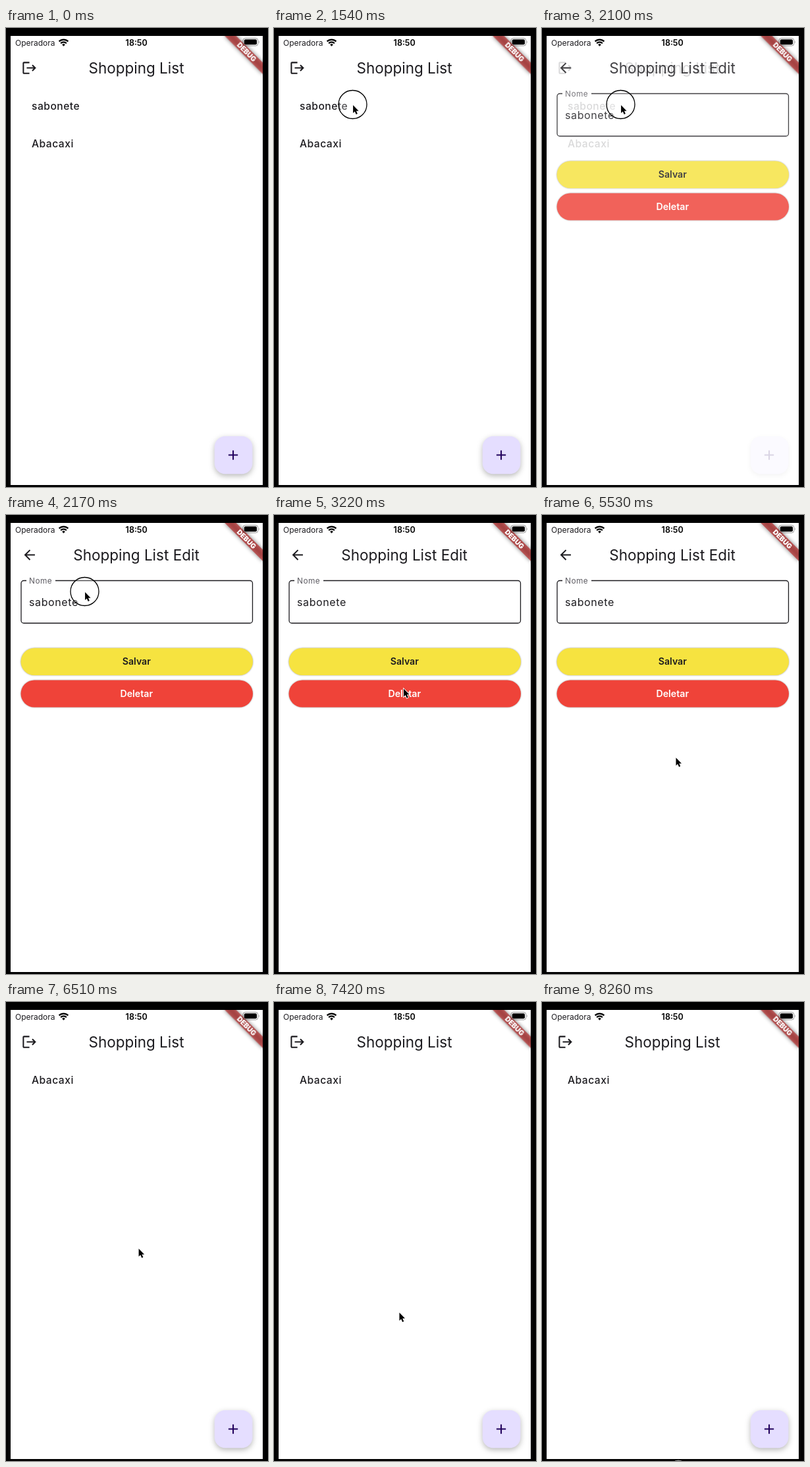
Write an HTML page that moves like this. It is 398 px wide and 696 px high and loops after 8330 ms.

```html
<!DOCTYPE html>
<html lang="pt">
<head>
<meta charset="utf-8">
<title>Shopping List</title>
<style>
  html, body { margin: 0; width: 100%; height: 100%; overflow: hidden; background: #000; }
  svg { display: block; width: 398px; height: 696px; font-family: Inter, Roboto, sans-serif; fill: #1c1b1f; }
  .title { font-size: 22.5px; text-anchor: middle; }
  .item { font-size: 15.6px; font-weight: 500; letter-spacing: .5px; }
  .field { font-size: 16px; letter-spacing: .6px; }
  .label { font-size: 11.8px; letter-spacing: .5px; fill: #5d5b62; }
  .button { font-size: 14.2px; font-weight: 600; text-anchor: middle; }
  .raised { filter: drop-shadow(0 .6px 1px rgba(0, 0, 0, .4)); }
  .fab { filter: drop-shadow(0 3px 4px rgba(0, 0, 0, .28)); }
</style>
</head>
<body>
<svg viewBox="0 0 398 696">
  <defs>
    <clipPath id="screen"><rect x="7" y="12" width="383" height="681"/></clipPath>
    <clipPath id="pill"><rect x="22.5" y="250.5" width="352.5" height="41" rx="20.5"/></clipPath>
    <filter id="blur" x="-30%" y="-150%" width="160%" height="400%"><feGaussianBlur stdDeviation="3"/></filter>
  </defs>
  <rect width="398" height="696" fill="#000"/>
  <rect x="7" y="12" width="383" height="681" fill="#fff"/>

  <g id="list">
    <path transform="translate(23.3 48.3) scale(1.021)" d="M17 7l-1.41 1.41L18.17 11H8v2h10.17l-2.58 2.58L17 17l5-5zM4 5h8V3H4c-1.1 0-2 .9-2 2v14c0 1.1.9 2 2 2h8v-2H4z"/>
    <text class="title" x="198" y="69">Shopping List</text>
    <text class="item" id="first" x="39" y="124">sabonete</text>
    <text class="item" id="second" x="39" y="181">Abacaxi</text>
    <rect class="fab" x="316.8" y="619" width="57.6" height="57.2" rx="16.3" fill="#e5deff"/>
    <path transform="translate(332.8 635.3) scale(1.021)" fill="#21005d" d="M19 13h-6v6h-2v-6H5v-2h6V5h2v6h6z"/>
  </g>

  <g id="edit">
    <path transform="translate(23.5 48.3) scale(1.021)" d="M20 11H7.83l5.59-5.59L12 4l-8 8 8 8 1.41-1.41L7.83 13H20z"/>
    <text class="title" x="198" y="69">Shopping List Edit</text>
    <path d="M31 99.5H27a4 4 0 0 0-4 4V160a4 4 0 0 0 4 4H370.5a4 4 0 0 0 4-4V103.5a4 4 0 0 0-4-4H75" fill="none" stroke="#1c1b1f" stroke-width="1.3"/>
    <text class="label" x="35" y="104.3">Nome</text>
    <text class="field" x="35" y="138">sabonete</text>
    <rect class="raised" x="22.5" y="201.7" width="352.5" height="41.3" rx="20.6" fill="#f6e340"/>
    <text class="button" x="198.3" y="227.2">Salvar</text>
    <rect class="raised" x="22.5" y="250.5" width="352.5" height="41" rx="20.5" fill="#ef4339"/>
    <g clip-path="url(#pill)"><circle id="ripple" cx="197.5" cy="271" fill="#6750a4"/></g>
    <text class="button" x="198.3" y="276.2" fill="#fff">Deletar</text>
  </g>

  <g clip-path="url(#screen)">
    <g transform="translate(390 12) rotate(45) scale(1.021)">
      <rect x="-40" y="28" width="80" height="12" fill="#000" opacity=".5" filter="url(#blur)"/>
      <rect x="-40" y="28" width="80" height="12" fill="#b71c1c" opacity=".627"/>
      <text y="37.7" font-size="10.2" font-weight="900" text-anchor="middle" fill="#fff">DEBUG</text>
    </g>
  </g>

  <text x="14" y="26.5" font-size="12">Operadora</text>
  <text x="198.2" y="26.5" font-size="12.5" font-weight="600" text-anchor="middle" fill="#000">18:50</text>
  <g fill="none" stroke="#000" stroke-width="2.2">
    <path d="M80.6 20.4a9.8 9.8 0 0 1 13.8 0M83.1 23.2a6.2 6.2 0 0 1 8.8 0"/>
    <path d="M87.5 27.7L85.2 25.3a3.2 3.2 0 0 1 4.6 0z" fill="#000" stroke="none"/>
  </g>
  <rect x="360" y="15.5" width="22.8" height="11.5" rx="3.5" fill="none" stroke="#000" stroke-opacity=".4"/>
  <rect x="361.8" y="17.3" width="19.2" height="7.9" rx="2" fill="#000"/>
  <path d="M384 19.5q1.8 1.7 0 3.5z" fill="#000" opacity=".45"/>

  <circle id="tap" r="21.5" fill="#fff" fill-opacity=".25" stroke="#000" stroke-width="1.3"/>
  <g id="cursor">
    <path transform="translate(.6 1.5) scale(.86)" d="M0 0V14L3.1 11.1 5.4 16.3 7.9 15.2 5.6 10.1H9.9z" fill="#000" stroke="#fff" stroke-width="2" paint-order="stroke"/>
  </g>
  <ellipse id="peek" cx="207" cy="697" rx="6" ry="2.3" fill="#999"/>
</svg>

<script>
const LOOP = 8330, STEP = 70, EXIT = 7140;
const $ = id => document.getElementById(id);
const set = (id, attrs) => { for (const k in attrs) $(id).setAttribute(k, attrs[k]); };
const show = (id, on) => set(id, { visibility: on ? "visible" : "hidden" });
const progress = (t, from, to) => Math.min(1, Math.max(0, (t - from) / (to - from)));
const ease = p => p * p * (3 - 2 * p);
const mix = (a, b, p) => a + (b - a) * p;

// time, x, y of the pointer
const path = [
  [140, 345, 652], [910, 119, 118.5], [980, 119.5, 115.5], [2450, 119.5, 115.5],
  [3290, 198, 265], [3500, 193, 269], [4270, 193, 269], [4830, 203, 366.5],
  [5460, 203, 366.5], [5880, 201.5, 367], [6020, 201.5, 367], [6370, 201, 372.5],
  [6650, 201, 372.5], [6930, 201.5, 371.5], [EXIT, 201.5, 371.5], [7910, 197.5, 698]
];

function pointerAt(t) {
  let i = 0;
  while (i < path.length - 2 && t >= path[i + 1][0]) i++;
  const [t0, x0, y0] = path[i], [t1, x1, y1] = path[i + 1];
  const p = ease(progress(t, t0, t1));
  const sway = t0 === EXIT ? -11 * Math.sin(2 * Math.PI * p) : 0;
  return [mix(x0, x1, p) + sway, mix(y0, y1, p)];
}

function draw(now) {
  const t = Math.floor(now % LOOP / STEP) * STEP;
  const removed = t >= 6510;
  const fade = removed ? 0 : progress(t, 1750, 2170);
  set("list", { opacity: 1 - fade });
  set("edit", { opacity: fade });
  $("first").textContent = removed ? "Abacaxi" : "sabonete";
  show("second", !removed);

  set("ripple", {
    r: t < 4060 ? 0 : 53 + .4 * (t - 4060),
    opacity: .16 * (1 - progress(t, 4270, 4620))
  });

  const [x, y] = pointerAt(t);
  set("cursor", { transform: `translate(${x} ${y})` });
  show("cursor", t >= 140 && t < 7910);
  set("tap", { cx: x, cy: y + .5 });
  show("tap", t >= 1540 && t < 2520 || t >= 4060 && t < 4270);
  show("peek", t >= 8260);
}

let start;
function tick(now) {
  start ??= now;
  draw(now - start);
  requestAnimationFrame(tick);
}
draw(0);
requestAnimationFrame(tick);
</script>
</body>
</html>
```
